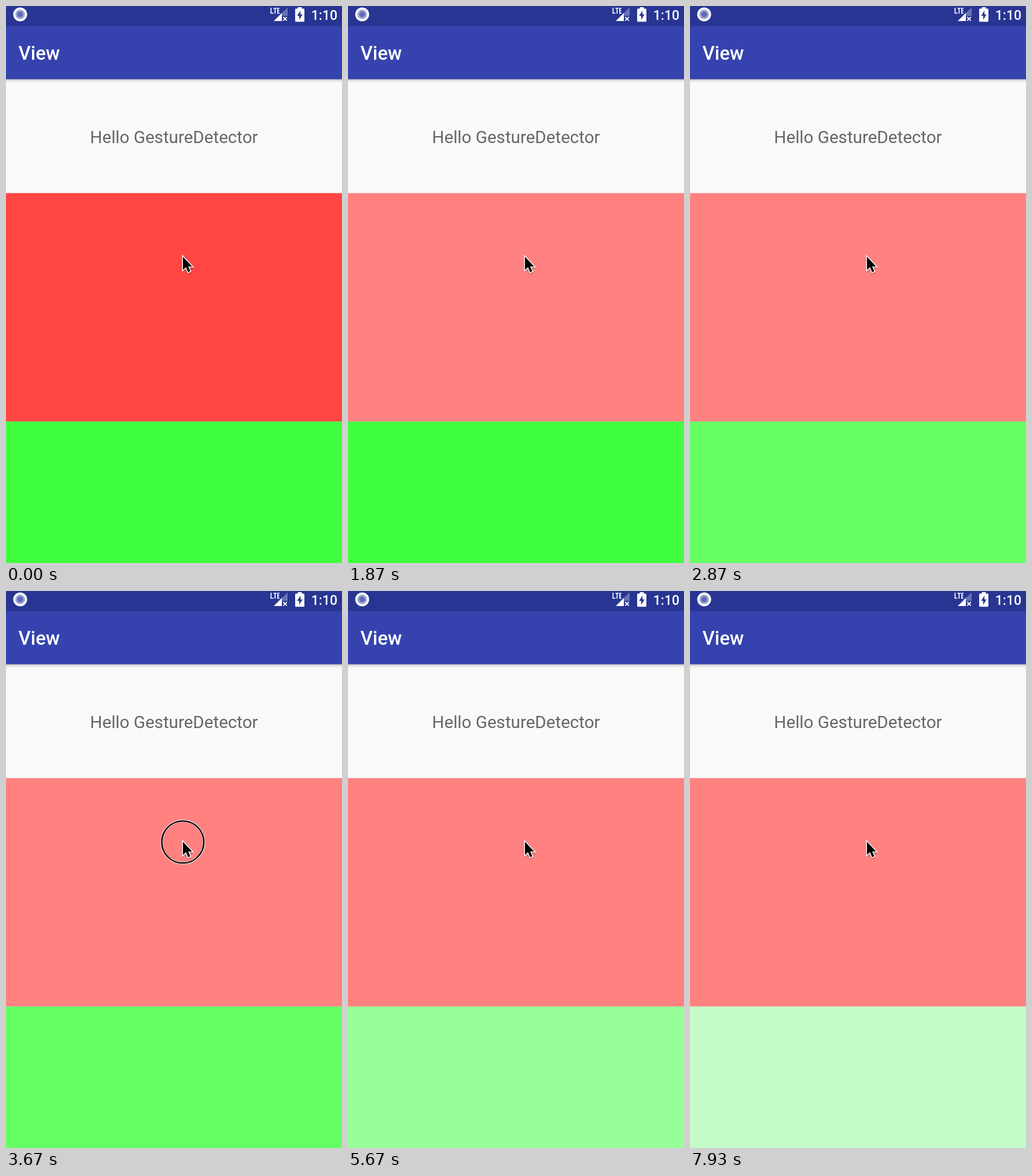
These frames come from a looping animation (581x963 px, 8000 ms). An HTML page:

```html
<!DOCTYPE html>
<html lang="en">
<head>
<meta charset="utf-8">
<title>View</title>
<style>
  html, body { margin: 0; width: 100%; height: 100%; overflow: hidden; background: #f9f9f9; }
  svg { display: block; width: 100%; height: 100%; }
  text { font-family: Roboto, sans-serif; }
  .medium { font-weight: 500; fill: #fff; }
</style>
</head>
<body>
<svg viewBox="0 0 581 963">
  <defs>
    <linearGradient id="shade" x2="0" y2="1">
      <stop stop-color="#000" stop-opacity=".32"/>
      <stop offset=".4" stop-color="#000" stop-opacity=".1"/>
      <stop offset="1" stop-color="#000" stop-opacity="0"/>
    </linearGradient>
    <filter id="blur" x="-50%" y="-50%" width="200%" height="200%">
      <feGaussianBlur stdDeviation="1.5"/>
    </filter>
    <path id="arrow" d="M306 433.5V456.3L311.2 451.6L315 460.2L318.6 458.6L315 450.5H322Z"/>
  </defs>

  <rect width="581" height="963" fill="#f9f9f9"/>
  <rect y="126" width="581" height="7" fill="url(#shade)"/>
  <rect y="34" width="581" height="92.5" fill="#3643af"/>
  <rect width="581" height="34.8" fill="#283593"/>

  <!-- status bar -->
  <circle cx="24.5" cy="14.5" r="12" fill="#fff"/>
  <circle cx="24.5" cy="14.5" r="8.3" fill="#9fa6d3"/>
  <circle cx="24.5" cy="14.5" r="5" fill="#5f6bb5"/>
  <path d="M458.3 3V12.3H462.4M462.4 4H468.2M465.3 4V13.2M473 4H469.9V12.3H473M469.9 8H472.6"
        fill="none" stroke="#fff" stroke-width="1.7"/>
  <path d="M477 12L487 2.5V17H477Z" fill="#6972b4"/>
  <path d="M463 26L477 12V26Z" fill="#fff"/>
  <path d="M479.3 19L485.7 25.4M485.7 19L479.3 25.4" stroke="#fff" stroke-width="1.8"/>
  <path d="M504.5 2H511.5V4.6H514.5Q516 4.6 516 6V25.8Q516 27.3 514.5 27.3H501.5Q500 27.3 500 25.8V6Q500 4.6 501.5 4.6H504.5Z" fill="#fff"/>
  <path d="M509.2 8L503.4 17H507V24L512.8 14.4H509.2Z" fill="#283593"/>
  <text class="medium" x="527.8" y="24" font-size="23">1:10</text>

  <text class="medium" x="21.5" y="93" font-size="32.8">View</text>
  <text x="290.5" y="237" font-size="29.6" text-anchor="middle" fill="#666">Hello GestureDetector</text>

  <rect id="red" y="323.5" width="581" height="395"/>
  <rect id="green" y="718.5" width="581" height="245"/>

  <g id="ring" fill="none">
    <circle cx="305.7" cy="434" r="36.7" stroke="#fff" stroke-opacity=".8" stroke-width="4"/>
    <circle cx="305.7" cy="434" r="36.4" stroke="#000" stroke-width="2.4"/>
  </g>
  <use href="#arrow" y="2" stroke="#000" stroke-width="2" opacity=".35" filter="url(#blur)"/>
  <use href="#arrow" stroke="#fff" stroke-width="3"/>
  <use href="#arrow"/>
</svg>
<script>
  const DURATION = 8000;
  // Each panel takes its next colour when a tap is released.
  const panels = {
    red: [[0, '#ff4643'], [800, '#ff6866'], [1865, '#ff8281']],
    green: [[0, '#40ff40'], [2800, '#65ff63'], [3730, '#82ff80'], [4865, '#98ff98'],
            [5800, '#aafda9'], [5930, '#b8fcb9'], [6065, '#c5fbc8']]
  };
  const releases = Object.values(panels).flatMap(steps => steps.slice(1).map(([time]) => time));
  const ring = document.getElementById('ring');

  const holdTime = release => release > 5900 ? 65 : 70;
  const isPressed = t => releases.some(end => t >= end - holdTime(end) && t < end);

  function draw(now) {
    const t = now % DURATION;
    for (const [id, steps] of Object.entries(panels)) {
      const [, color] = steps.findLast(([time]) => time <= t);
      document.getElementById(id).setAttribute('fill', color);
    }
    ring.setAttribute('visibility', isPressed(t) ? 'visible' : 'hidden');
  }

  const start = performance.now();
  function tick() {
    draw(performance.now() - start);
    requestAnimationFrame(tick);
  }
  tick();
</script>
</body>
</html>
```
